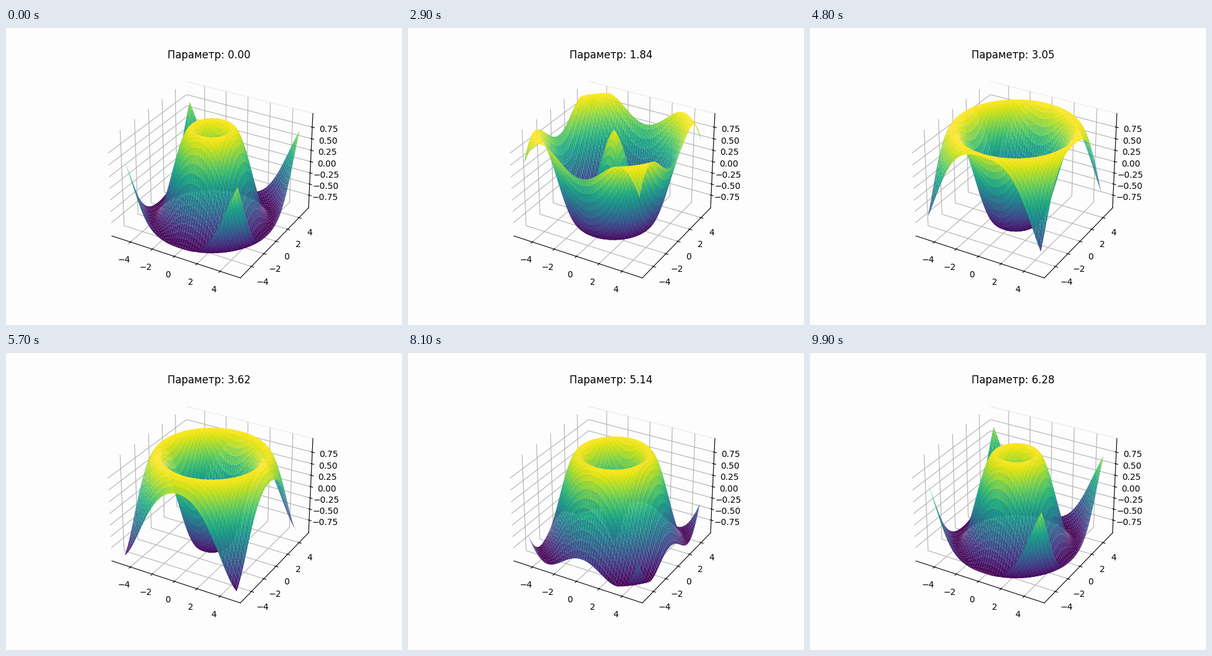
Recreate the animation shown at these times as a matplotlib script. Size 640 by 480 pixels, loop 10 s.

```python
import numpy as np
import matplotlib.pyplot as plt
from matplotlib.animation import FuncAnimation

FRAMES = 100
PAPER = "#fdfdfd"

x, y = np.meshgrid(np.linspace(-5, 5, 100), np.linspace(-5, 5, 100))
radius = np.hypot(x, y)
params = np.linspace(0, 2 * np.pi, FRAMES)

fig = plt.figure(figsize=(6.4, 4.8), dpi=100, facecolor=PAPER)
ax = fig.add_subplot(projection="3d", facecolor=PAPER)

# 5 % data margin on x and y, then 1/48 of padding on every axis
side = 5.5 * (1 + 1 / 24)
top = 1 + 1 / 24
ax.set(xlim=(-side, side), ylim=(-side, side), zlim=(-top, top),
       zticks=np.arange(-0.75, 0.76, 0.25))
for axis in (ax.xaxis, ax.yaxis, ax.zaxis):
    axis.set_pane_color(PAPER)
ax.yaxis.pane.set_edgecolor("0.93")

title = ax.set_title("")
surface = None


def update(i):
    global surface
    if surface is not None:
        surface.remove()
    surface = ax.plot_surface(x, y, np.sin(radius + params[i]), cmap="viridis")
    title.set_text(f"Параметр: {params[i]:.2f}")
    return surface, title


anim = FuncAnimation(fig, update, frames=FRAMES, interval=100,
                     init_func=lambda: (), repeat=True, repeat_delay=0)
plt.show()
```
